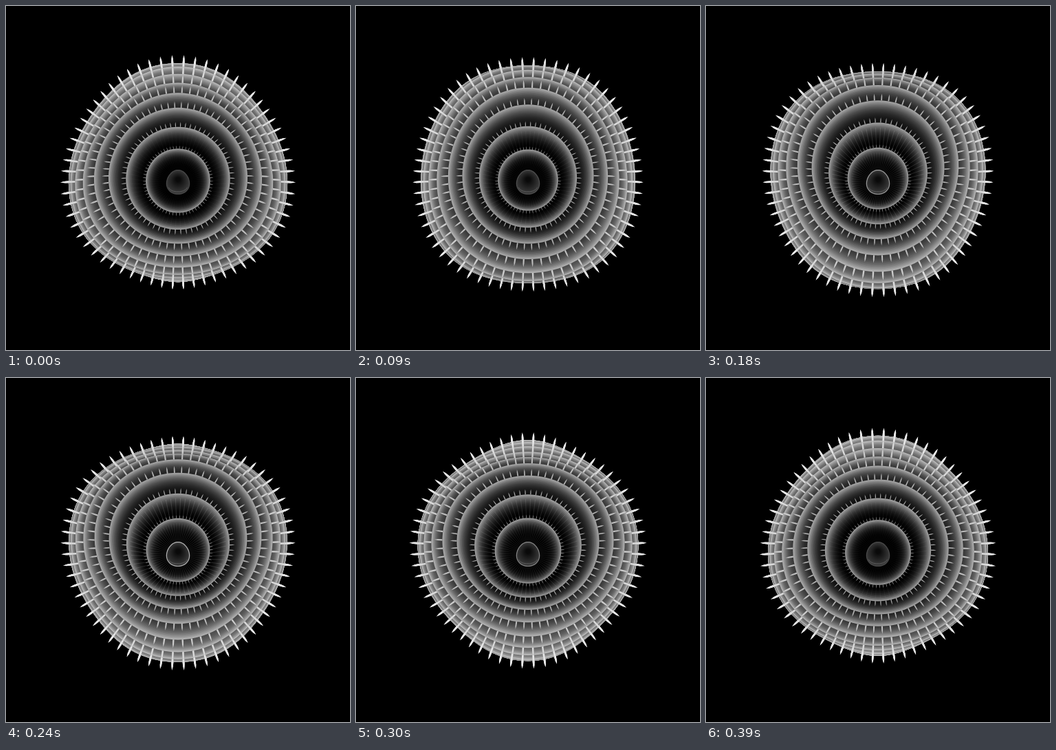
An HTML page with a canvas for the animation above (420 ms loop, 500 px wide and 500 px high).

```html
<!DOCTYPE html>
<html lang="en">
<head>
<meta charset="utf-8">
<title>Spiked sphere</title>
<style>
  html, body { margin: 0; width: 100%; height: 100%; overflow: hidden; background: #000; }
  canvas { display: block; width: 500px; height: 500px; }
</style>
</head>
<body>
<canvas id="stage" width="500" height="500"></canvas>
<script>
const ctx = document.getElementById('stage').getContext('2d');
const TAU = Math.PI * 2;
const LOOP = 420, STEP = 30;
const SPIKES = 64, RINGS = 10, BAND = 0.14, SHADES = 16;
let time = 0;

const gray = (v, a = 1) => `rgba(${v},${v},${v},${a})`;
const phase = shift => TAU * (time - shift) / LOOP;

// Projects a point of the sphere, seen from its pole, with a wave running down it.
// The wave is weaker towards the left and right sides.
function project(ring, angle, height = 0) {
  const polar = (ring + 0.5) * BAND;
  const nx = Math.sin(polar) * Math.cos(angle);
  const lat = Math.asin(Math.sin(polar) * Math.sin(angle));
  const swell = 0.039 * (1 - 0.7 * nx * nx);
  const rho = 1 + height + swell * Math.cos(phase(335) - 4 * lat);
  const r = 447 * rho * Math.sin(polar) / (3 - rho * Math.cos(polar));
  const lift = ring < 5.43 ? 7 * Math.cos(0.85 * ring + 0.1) : 0;
  return [250 + r * Math.cos(angle), 248 + lift + r * Math.sin(angle)];
}

function tracePath(pointAt, count) {
  ctx.beginPath();
  for (let k = 0; k < count; k++) ctx.lineTo(...pointAt(k / count * TAU));
  ctx.closePath();
}

function eachSpike(draw) {
  for (let k = 0; k < SPIKES; k++) draw((k + 0.5) * TAU / SPIKES);
}

function drawSpikes(ring) {
  const half = 0.009;
  ctx.beginPath();
  eachSpike(a => {
    ctx.moveTo(...project(ring, a - half));
    ctx.lineTo(...project(ring, a - half * 0.8, 0.04));
    ctx.lineTo(...project(ring, a, 0.067));
    ctx.lineTo(...project(ring, a + half * 0.8, 0.04));
    ctx.lineTo(...project(ring, a + half));
  });
  ctx.fillStyle = gray(Math.min(235, 140 + ring * 13));
  ctx.fill();
}

function drawThreads(ring, alpha) {
  ctx.beginPath();
  eachSpike(a => {
    ctx.moveTo(...project(ring, a));
    ctx.lineTo(...project(ring + 0.8, a));
  });
  ctx.lineWidth = 0.7;
  ctx.strokeStyle = gray(255, alpha);
  ctx.stroke();
}

function drawBand(ring) {
  const edge = Math.min(205, 138 + 8 * ring);
  const deep = Math.max(0, ring - 2.2) * 20;
  const fall = 1 + 3.2 / ring;
  for (let k = 0; k < SHADES; k++) {
    const f = k / SHADES;
    tracePath(a => project(ring - f, a), 96);
    ctx.fillStyle = gray(Math.round(deep + (edge - deep) * (1 - f) ** fall));
    ctx.fill();
  }
}

function drawCore(glow) {
  const fill = ctx.createRadialGradient(250, 252, 3, 250, 256, 20);
  fill.addColorStop(0, gray(10));
  fill.addColorStop(1, gray(68));
  tracePath(a => [
    250 + 16.5 * Math.cos(a) * (1 + 0.12 * Math.sin(a)),
    256 + 17.5 * Math.sin(a)
  ], 60);
  ctx.fillStyle = fill;
  ctx.fill();
  ctx.lineWidth = 1.2;
  ctx.strokeStyle = gray(Math.round(72 + 110 * glow * glow));
  ctx.stroke();
  ctx.beginPath();
  ctx.ellipse(250, 262, 14, 8, 0, 0.2, Math.PI - 0.2);
  ctx.lineWidth = 1;
  ctx.strokeStyle = gray(90);
  ctx.stroke();
}

function frame(now) {
  time = Math.floor(now % LOOP / STEP) * STEP;
  const glow = 0.5 - 0.5 * Math.cos(phase(20));
  ctx.fillStyle = '#000';
  ctx.fillRect(0, 0, 500, 500);
  for (let ring = RINGS; ring > 0; ring--) {
    if (ring === 1) drawThreads(1, 0.04 + 0.16 * glow);
    drawSpikes(ring);
    drawBand(ring);
  }
  drawThreads(0, 0.03 + 0.1 * glow);
  drawCore(glow);
  requestAnimationFrame(frame);
}
requestAnimationFrame(frame);
</script>
</body>
</html>
```
